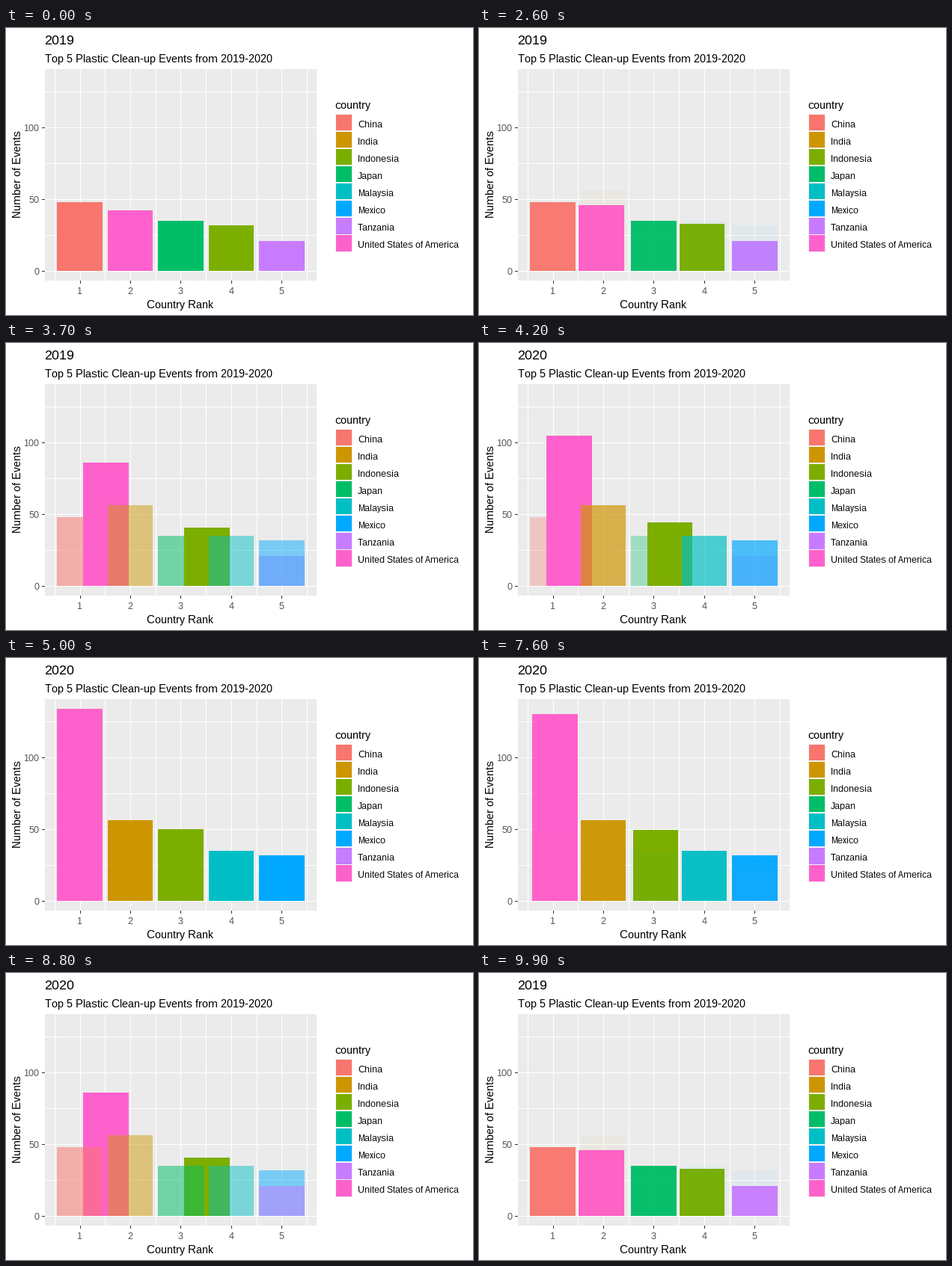
A matplotlib script for the animation above (10 s loop, 624x384 px).

```python
import matplotlib.pyplot as plt
from matplotlib.animation import FuncAnimation
from matplotlib.patches import Rectangle

W, H, DPI = 624, 384, 96
HOLD, MOVE = 25, 25          # frames of rest and of transition per state
HALF = HOLD + MOVE

plt.rcParams.update({
    "font.family": "Liberation Sans",
    "text.hinting": "native",
    "text.hinting_factor": 1,
    "text.kerning_factor": 6,
})

COLORS = {
    "China": "#F8766D", "India": "#CD9600", "Indonesia": "#7CAE00",
    "Japan": "#00BE67", "Malaysia": "#00BFC4", "Mexico": "#00A9FF",
    "Tanzania": "#C77CFF", "United States of America": "#FF61CC",
}
# year -> {country: number of events}, in rank order
EVENTS = {
    "2019": {"China": 48, "United States of America": 42, "Japan": 35,
             "Indonesia": 32, "Tanzania": 21},
    "2020": {"United States of America": 134, "India": 56, "Indonesia": 50,
             "Malaysia": 35, "Mexico": 32},
}
PLACES = {year: {c: (rank, n) for rank, (c, n) in enumerate(rows.items(), 1)}
          for year, rows in EVENTS.items()}

fig = plt.figure(figsize=(W / DPI, H / DPI), dpi=DPI, facecolor="white")
ax = fig.add_axes([0, 0, 1, 1])
ax.set_xlim(0, W)
ax.set_ylim(H, 0)
ax.axis("off")


def px(rank):
    return 51.92 + (rank - 0.305) * 67.37


def py(value):
    return 324.9 - value * 1.918


def box(x0, y0, x1, y1, color, z=1):
    patch = Rectangle((x0, y0), x1 - x0, y1 - y0, facecolor=color,
                      linewidth=0, antialiased=False, zorder=z)
    return ax.add_patch(patch)


def label(x, y, text, size, color="black", **kw):
    return ax.text(x, y, text, fontsize=size * 72 / DPI, color=color,
                   va="baseline", zorder=50, **kw)


def draw_panel():
    box(52, 55, 415, 338, "#EBEBEB", 0)
    for i in range(11):
        x = round(px(0.5 + i / 2))
        box(x, 55, x + 1, 338, "white")
    for value in range(0, 126, 25):
        y = round(py(value))
        box(52, y, 415, y + 1, "white")
    for rank in range(1, 6):
        x = round(px(rank))
        box(x, 338, x + 1, 342, "#333333")
        label(px(rank), 356, str(rank), 12, "#4D4D4D", ha="center")
    for value in (0, 50, 100):
        y = round(py(value))
        box(48, y, 52, y + 1, "#333333")
        label(44.5, y + 5, str(value), 12, "#4D4D4D", ha="right")
    label(52, 46, "Top 5 Plastic Clean-up Events from 2019-2020", 15)
    label(233, 375, "Country Rank", 15, ha="center")
    label(20, 196, "Number of Events", 15, rotation=90, ha="center",
          rotation_mode="anchor")


def draw_legend():
    label(439, 108, "country", 15)
    box(440, 115, 463, 300, "#F2F2F2")
    for i, (name, color) in enumerate(COLORS.items()):
        top = 116.13 + 23.04 * i
        box(441, round(top), 462, round(top + 21.15), color, 2)
        label(470, round(top + 17), name, 12)


draw_panel()
draw_legend()
title = label(51, 22, "2019", 18)
bars = {name: box(0, 0, 0, 0, color, 5) for name, color in COLORS.items()}


def update(frame):
    old, new = ("2019", "2020") if frame < HALF else ("2020", "2019")
    step = max(0, frame % HALF - HOLD)
    p = step / MOVE
    before, after = PLACES[old], PLACES[new]
    # arriving bars are drawn on top
    order = list(before) + [c for c in after if c not in before]

    for name, bar in bars.items():
        bar.set_visible(name in order)
        if name not in order:
            continue
        rank0, n0 = before.get(name) or after[name]
        rank1, n1 = after.get(name) or before[name]
        rank = rank0 + (rank1 - rank0) * p
        top = round(py(n0 + (n1 - n0) * p))
        left, right = round(px(rank - 0.45)), round(px(rank + 0.45))
        bar.set_bounds(left, top, right - left, 325 - top)
        if name not in after:
            bar.set_alpha(1 - p)
        elif name not in before:
            bar.set_alpha(p)
        else:
            bar.set_alpha(1)
        bar.set_zorder(5 + order.index(name))

    title.set_text(old if step <= 13 else new)
    return [title, *bars.values()]


anim = FuncAnimation(fig, update, frames=2 * HALF, interval=100, repeat=True,
                     init_func=lambda: update(0), blit=False)
plt.show()
```
